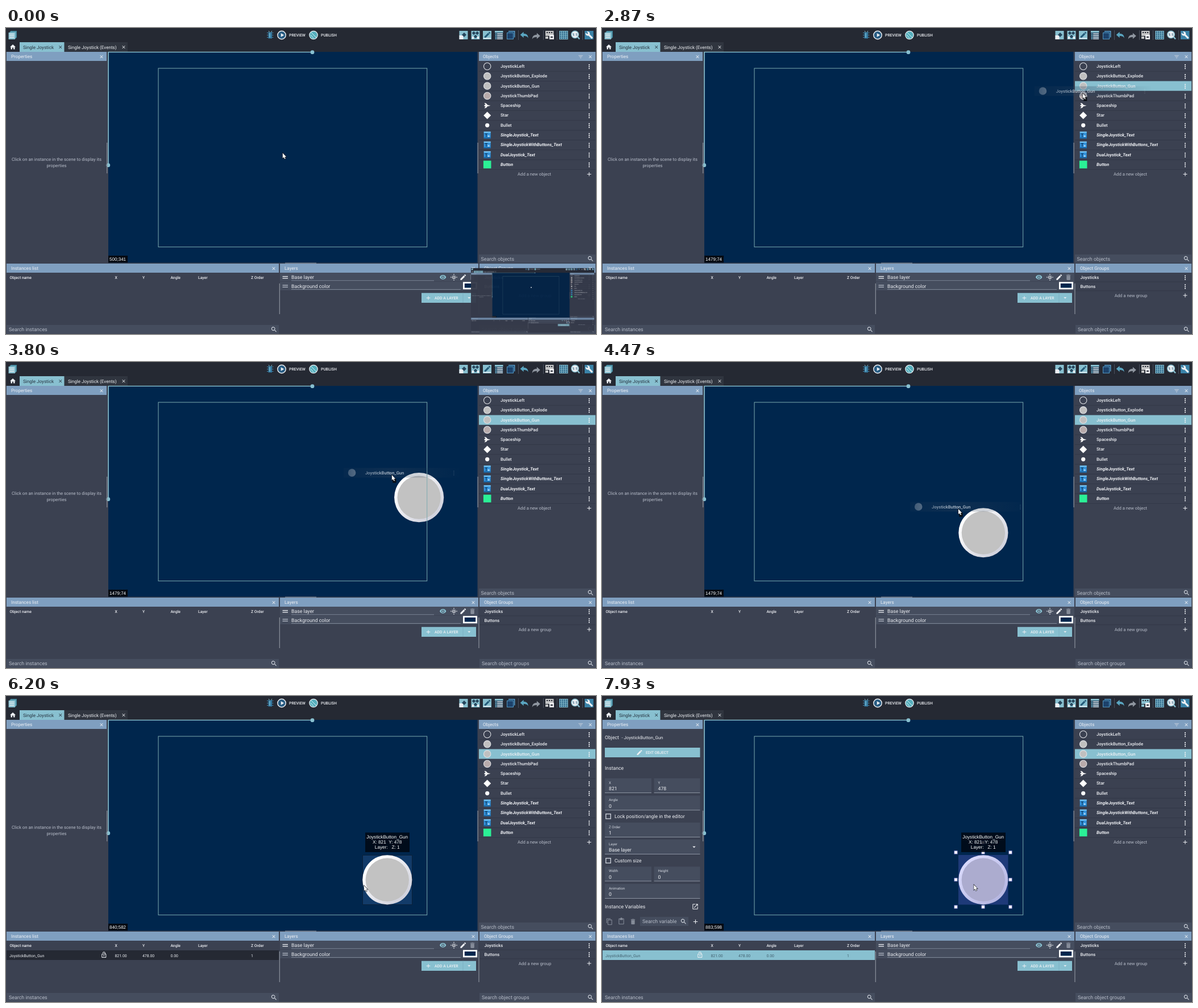
Recreate the animation shown at these times as an HTML page with a canvas. Size 1038x539 px, loop 8000 ms.

```html
<!DOCTYPE html>
<html lang="en">
<head>
<meta charset="utf-8">
<title>Scene editor</title>
<style>
html, body { margin: 0; width: 100%; height: 100%; overflow: hidden; background: #252933; }
canvas { display: block; width: 1038px; height: 539px; }
</style>
</head>
<body>
<canvas id="stage" width="1038" height="539"></canvas>
<script>
const canvas = document.getElementById('stage');
const c = canvas.getContext('2d');
const LOOP = 8000, DRAG = 2670, DROP = 5400, HOVER = 5670, CLICK = 6730;
const BAR = '#252933', PANEL = '#3b4151', FIELD = '#454d5e', HEAD = '#7f9fc0', TEAL = '#88c0d0';
const NAVY = '#00264d', WHITE = '#eef0f4', PALE = '#d3d8e0', MUTED = '#b6bcc8';
const ORIGIN = [268, 71], ZOOM = 0.4375;

// pointer path: time, x, y
const KEYS = [
  [0, 486.8, 220.3], [500, 540, 212], [870, 640, 200], [1000, 710, 181.2], [1070, 741, 174],
  [1300, 812, 140], [1730, 893, 107], [2200, 915.1, 103.4], [2640, 915.1, 103.4], [2870, 846, 115],
  [3470, 738, 171], [3800, 679, 199], [4330, 629, 256.5], [4470, 627, 259], [5200, 627, 281.5],
  [5650, 627, 281.5], [6130, 635.5, 325.6], [6200, 630, 334], [6470, 650, 335],
  [6750, 654.3, 332.6], [8000, 654.3, 332.6]
];
const PRESS = [917, 106];

const ICONS = Object.fromEntries(Object.entries({
  close: 'M19 6.4 17.6 5 12 10.6 6.4 5 5 6.4 10.6 12 5 17.6 6.4 19 12 13.4 17.6 19 19 17.6 13.4 12z',
  add: 'M19 13h-6v6h-2v-6H5v-2h6V5h2v6h6z',
  home: 'M10 20v-6h4v6h5v-8h3L12 3 2 12h3v8z',
  pencil: 'M3 17.25V21h3.75L17.81 9.94l-3.75-3.75zM20.7 7.04a1 1 0 0 0 0-1.41l-2.34-2.34a1 1 0 0 0-1.41 0l-1.83 1.83 3.75 3.75z',
  trash: 'M6 19a2 2 0 0 0 2 2h8a2 2 0 0 0 2-2V7H6zM19 4h-3.5l-1-1h-5l-1 1H5v2h14z',
  search: 'M15.5 14h-.8l-.3-.3a6.5 6.5 0 1 0-.7.7l.3.3v.8l5 5 1.5-1.5zM9.5 14a4.5 4.5 0 1 1 0-9 4.5 4.5 0 0 1 0 9z',
  eye: 'M12 4.5C7 4.5 2.7 7.6 1 12c1.7 4.4 6 7.5 11 7.5s9.3-3.1 11-7.5C21.3 7.6 17 4.5 12 4.5zM12 17a5 5 0 1 1 0-10 5 5 0 0 1 0 10zm0-8a3 3 0 1 0 0 6 3 3 0 0 0 0-6z',
  filter: 'M10 18h4v-2h-4zM3 6v2h18V6zM6 13h12v-2H6z',
  open: 'M19 19H5V5h7V3H5a2 2 0 0 0-2 2v14a2 2 0 0 0 2 2h14a2 2 0 0 0 2-2v-7h-2zM14 3v2h3.6l-9.8 9.8 1.4 1.4L19 6.4V10h2V3z',
  copy: 'M16 1H4a2 2 0 0 0-2 2v14h2V3h12zM19 5H8a2 2 0 0 0-2 2v14a2 2 0 0 0 2 2h11a2 2 0 0 0 2-2V7a2 2 0 0 0-2-2zm0 16H8V7h11z',
  paste: 'M19 2h-4a3 3 0 0 0-6 0H5a2 2 0 0 0-2 2v16a2 2 0 0 0 2 2h14a2 2 0 0 0 2-2V4a2 2 0 0 0-2-2zM19 20H5V4h2v3h10V4h2z',
  lock: 'M18 8h-1V6A5 5 0 0 0 7 6h1.9a3.1 3.1 0 0 1 6.2 0v2H6a2 2 0 0 0-2 2v10a2 2 0 0 0 2 2h12a2 2 0 0 0 2-2V10a2 2 0 0 0-2-2zM18 20H6V10h12zM12 17a2 2 0 1 0 0-4 2 2 0 0 0 0 4z',
  wrench: 'M22.7 19l-9.1-9.1c.9-2.3.4-5-1.5-6.9-2-2-5-2.4-7.4-1.3L9 6 6 9 1.6 4.7C.4 7.1.9 10.1 2.9 12.1c1.9 1.9 4.6 2.4 6.9 1.5l9.1 9.1c.4.4 1 .4 1.4 0l2.3-2.3c.5-.4.5-1.1.1-1.4z',
  undo: 'M10 9V4l-9 8 9 8v-5c6 0 10 1 12 6 0-8-4-12-12-12z',
  redo: 'M14 9V4l9 8-9 8v-5c-6 0-10 1-12 6 0-8 4-12 12-12z',
  down: 'M6 9l6 6 6-6z',
  play: 'M8 4v16l13-8z',
  ship: 'M2 3c6 0 9 3 10 6l11 3-11 3c-1 3-4 6-10 6l4-6-4-1v-4l4-1z',
  arrow: 'M0 0V9L2 7.2 3.5 10.4 4.9 9.8 3.5 6.7H6.2z'
}).map(([name, d]) => [name, new Path2D(d)]));

function rect(x, y, w, h, fill) { c.fillStyle = fill; c.fillRect(x, y, w, h); }
function box(x, y, w, h, stroke, width = 1) {
  c.strokeStyle = stroke; c.lineWidth = width; c.strokeRect(x, y, w, h);
}
function disc(x, y, r, fill, stroke, width = 1) {
  c.beginPath(); c.arc(x, y, r, 0, 7);
  if (fill) { c.fillStyle = fill; c.fill(); }
  if (stroke) { c.strokeStyle = stroke; c.lineWidth = width; c.stroke(); }
}
function line(x1, y1, x2, y2, stroke, width = 1) {
  c.beginPath(); c.moveTo(x1, y1); c.lineTo(x2, y2);
  c.strokeStyle = stroke; c.lineWidth = width; c.stroke();
}
function text(s, x, y, size = 7.75, fill = WHITE, style = '400', align = 'left', family = 'Roboto') {
  c.font = `${style} ${size}px ${family}, sans-serif`;
  c.textAlign = align; c.fillStyle = fill; c.fillText(s, x, y);
}
function icon(name, x, y, size, fill = WHITE) {
  c.save();
  c.translate(x - size / 2, y - size / 2);
  c.scale(size / 24, size / 24);
  c.fillStyle = fill; c.fill(ICONS[name], 'evenodd');
  c.restore();
}
function dots(x, y, fill = WHITE) { for (const d of [-3.2, 0, 3.2]) disc(x, y + d, 1.1, fill); }
function header(s, x, y, w, indent) {
  rect(x, y, w, 16, HEAD);
  text(s, x + indent, y + 11.2, 8.1);
  icon('close', x + w - 9, y + 8.6, 9);
}
function searchBar(s, x, y, w, h, indent) {
  rect(x, y, w, h, FIELD);
  text(s, x + indent, y + h / 2 + 3.3, 8.9, MUTED);
  icon('search', x + w - 8.5, y + h / 2 + .3, 12.5, PALE);
}

// monotone cubic interpolation of the pointer path
function pointer(t) {
  t = Math.max(0, Math.min(LOOP, t));
  let i = KEYS.findIndex(k => k[0] > t) - 1;
  if (i < 0) i = KEYS.length - 2;
  return [1, 2].map(a => {
    const slope = n => n < 0 || n > KEYS.length - 2 ? 0
      : (KEYS[n + 1][a] - KEYS[n][a]) / (KEYS[n + 1][0] - KEYS[n][0]);
    const tangent = n => {
      const p = slope(n - 1), q = slope(n);
      return p * q <= 0 ? 0 : 2 * p * q / (p + q);
    };
    const h = KEYS[i + 1][0] - KEYS[i][0], u = (t - KEYS[i][0]) / h, v = 1 - u;
    return v * v * (1 + 2 * u) * KEYS[i][a] + u * u * (3 - 2 * u) * KEYS[i + 1][a]
      + h * u * v * (v * tangent(i) - u * tangent(i + 1));
  });
}

function toolbar(selected) {
  rect(0, 0, 1038, 42, BAR);
  rect(8, 5, 11, 12, '#3f8298'); rect(6.5, 6.5, 11, 12, '#69aabb'); rect(4.5, 8, 11.5, 12, TEAL);
  for (const y of [10, 13, 16]) rect(6, y, 8.5, 1.3, WHITE);
  // bug
  for (const y of [8.5, 12.5, 16.5]) line(459, y, 470.5, y, '#4383a5');
  line(462, 5, 464, 8, TEAL); line(468, 5, 466, 8, TEAL);
  rect(461.5, 7.5, 6.5, 11, '#3478a0'); rect(463, 9, 2, 8, '#66aac4');
  disc(485, 12.5, 7.2, '#285c83', WHITE, 1.4);
  icon('play', 485.4, 12.5, 10);
  text('PREVIEW', 498, 15.2, 6.85, WHITE, '500');
  disc(541, 12.5, 7.2, '#55aebc', WHITE, 1.2);
  line(536.5, 7.5, 546, 17, '#d8f1f4'); line(536, 12, 541, 18, '#d8f1f4');
  text('PUBLISH', 554, 15.2, 6.85, WHITE, '500');

  for (const x of [797.5, 818.5, 839]) rect(x, 5, 15, 15, TEAL);
  const gem = (x, y, r, fill) => {
    c.beginPath(); c.moveTo(x, y - r); c.lineTo(x + r, y); c.lineTo(x, y + r); c.lineTo(x - r, y);
    c.fillStyle = fill; c.fill();
  };
  rect(797.5, 13, 7, 7, WHITE); gem(806, 12, 4, '#26465d');
  for (const [x, y] of [[823, 9], [829, 9], [826, 15]]) gem(x, y, 3.2, '#26465d');
  rect(820, 15, 3, 4, WHITE); rect(829, 15, 3, 4, WHITE);
  icon('pencil', 847, 12, 14, '#245a78'); rect(840, 17.5, 13, 1.5, WHITE);
  rect(860, 5, 14.5, 15, '#274d68'); rect(860, 5, 14.5, 3, TEAL);
  for (const y of [9.5, 12.5, 15.5, 18.3]) { rect(861, y, 2, 1.4, TEAL); rect(864, y, 10, 1.4, WHITE); }
  rect(884, 5, 11.5, 11.5, '#5c9bc5'); rect(882.5, 6.5, 11.5, 11.5, '#18446c');
  box(881.5, 8.5, 11, 11, '#5294bd'); rect(882, 9, 10, 10, '#1d426b');
  icon('undo', 912, 12, 16, '#5aa5c0');
  icon('redo', 932.5, 14, 16, '#8e959f');
  const tone = selected ? TEAL : '#c4c5c6';
  rect(949, 5, 14.5, 9, tone);
  for (const x of [951, 955, 959]) rect(x, 7, 2.2, 2, BAR);
  rect(949, 15, 5, 4, tone); rect(956, 12, 8, 8, WHITE); rect(958, 15, 4, 2, BAR);
  rect(973.5, 5, 15, 15, '#235b80');
  for (let i = 0; i < 5; i++) {
    rect(973.5 + i * 3.5, 5, 1.1, 15, TEAL); rect(973.5, 5 + i * 3.5, 15, 1.1, TEAL);
  }
  line(1005, 15, 1009, 19.5, TEAL, 2.4);
  disc(1001, 11.5, 6.3, WHITE, TEAL, 1.5);
  text('1:1', 1001, 14, 6.5, '#245a78', '700', 'center');
  rect(1018, 5, 15.5, 15, '#3a83a8'); icon('wrench', 1026, 12.5, 14);
  for (const x of [901.5, 945.5, 969.5, 1014.5]) rect(x - .5, 4, 1, 17, '#4a505d');

  icon('home', 12, 33.5, 12);
  rect(24, 25, 78.5, 17, TEAL);
  text('Single Joystick', 30, 36.8, 8.1, '#26323f');
  icon('close', 95.7, 33.7, 9, '#26323f');
  rect(103, 25, 111, 17, '#30353f');
  text('Single Joystick (Events)', 109, 36.8, 8.1);
  icon('close', 207, 33.7, 9);
}

function field(name, value, x, y, w) {
  rect(x, y, w, 25.5, FIELD); rect(x, y + 25, w, 1, '#8b93a1');
  text(name, x + 7, y + 9.7, 6.2, PALE);
  text(value, x + 7, y + 21, 8.7);
}
function checkbox(s, y) {
  box(6.8, y + .8, 8.4, 8.4, PALE, 1.3);
  text(s, 22, y + 8, 8.65);
}
function properties(selected) {
  header('Properties', 1, 42, 176, 8);
  if (!selected) {
    text('Click on an instance in the scene to display its', 89, 234, 7.75, MUTED, '400', 'center');
    text('properties', 89, 245, 7.75, MUTED, '400', 'center');
    return;
  }
  text('Object', 5, 75.7, 8.7);
  text('- JoystickButton_Gun', 34.5, 75.7, 7.75);
  rect(5, 91, 167.5, 17, TEAL);
  icon('pencil', 66, 99.5, 12);
  text('EDIT OBJECT', 77, 102, 6.7, WHITE, '500');
  text('Instance', 5, 130, 8.7);
  field('X', '821', 5, 145, 82); field('Y', '478', 91.5, 145, 81);
  field('Angle', '0', 5, 175.5, 167.5);
  checkbox('Lock position/angle in the editor', 207);
  field('Z Order', '1', 5, 223, 167.5);
  field('Layer', 'Base layer', 5, 253, 167.5); icon('down', 162, 266, 11);
  checkbox('Custom size', 285);
  field('Width', '0', 5, 300.5, 82); field('Height', '0', 91.5, 300.5, 81);
  field('Animation', '0', 5, 331, 167.5);
  text('Instance Variables', 5, 374, 8.7);
  icon('open', 164, 371, 12.5);
  icon('copy', 13, 397.5, 12.5, '#858c99'); icon('paste', 34, 397, 12.5, '#858c99');
  icon('trash', 54.5, 397.5, 12.5, '#858c99');
  searchBar('Search variable', 67, 389, 85, 16, 4);
  icon('add', 164.5, 397.5, 13);
}

function rowIcon(i, y) {
  const x = 846.7;
  if (i < 4) disc(x, y, 6.2, [null, '#c0c0c0', '#c0c0c0', '#b8abab'][i], '#dfe1e5', 1.1);
  else if (i === 4) icon('ship', x, y, 12.5, '#f4f4f4');
  else if (i === 5) {
    c.save(); c.translate(x, y); c.rotate(Math.PI / 4); rect(-4.6, -4.6, 9.2, 9.2, '#fff'); c.restore();
  } else if (i === 6) disc(x, y, 3.6, '#fff');
  else if (i < 10) {
    rect(x - 6, y - 6, 12, 12, '#3393dc'); rect(x - 6, y - 6, 12, 2, '#7ac5ef');
    rect(x - 6, y + 4, 12, 2, '#1765a3');
    text('T', x - 4.5, y + 3.5, 8.5, '#0c3457', '700'); text('a', x + .8, y + 3.3, 6, '#d2ecfb', '700');
  } else rect(x - 6.8, y - 6.8, 13.6, 13.6, '#2bf096');
}
function objects(picked) {
  header('Objects', 832, 42, 205, 7);
  icon('filter', 1011, 50.7, 10, PALE);
  ['JoystickLeft', 'JoystickButton_Explode', 'JoystickButton_Gun', 'JoystickThumbPad', 'Spaceship', 'Star',
    'Bullet', 'SingleJoystick_Text', 'SingleJoystickWithButtons_Text', 'DualJoystick_Text', 'Button'
  ].forEach((name, i) => {
    const y = 67.5 + i * 17.3;
    rect(832, y + 8.3, 205, 1, '#323847');
    if (picked && i === 2) rect(832, y - 8.6, 205, 17.2, TEAL);
    rowIcon(i, y);
    text(name, 870, y + 2.4, 7.65, WHITE, i < 7 ? '500' : 'italic 700');
    dots(1026, y + .6);
  });
  text('Add a new object', 929.5, 260, 7.7, MUTED, '400', 'center');
  icon('add', 1026, 257.5, 12);
  searchBar('Search objects', 832, 399, 205, 14.5, 3.5);
}

function bottom(t) {
  header('Instances list', 1, 415, 479, 8);
  [['Object name', 6.5], ['X', 191.5], ['Y', 240], ['Angle', 289.5], ['Layer', 338], ['Z Order', 431]]
    .forEach(([s, x]) => text(s, x, 441.5, 6.8, WHITE, '500'));
  if (t >= DROP) {
    const on = t >= CLICK, ink = on ? '#42606f' : WHITE;
    rect(1, 448, 479, 17, on ? TEAL : BAR);
    [['JoystickButton_Gun', 6], ['821.00', 191.5], ['478.00', 240], ['0.00', 289.5], ['1', 431]]
      .forEach(([s, x]) => text(s, x, 459.5, 6.9, ink));
    icon('lock', 172.3, 456, 12);
  }
  searchBar('Search instances', 1, 523, 479, 15.5, 4);

  header('Layers', 482, 415, 349, 8);
  rect(482, 431, 349, 15.3, FIELD); rect(482, 447, 349, 15, FIELD);
  [['Base layer', 442, 251, WHITE], ['Background color', 457.5, 298, MUTED]].forEach(([s, y, w, tone]) => {
    rect(486.5, y - 5, 9.5, 1.3, tone); rect(486.5, y - 1.8, 9.5, 1.3, tone);
    text(s, 502, y, 8.75); rect(502, y + 2.5, w, 1, '#7d8695');
  });
  icon('eye', 768.7, 439, 12.5, TEAL);
  disc(788, 439, 2, null, WHITE, 1.2);
  for (let i = 0; i < 8; i++) {
    const a = i * Math.PI / 4, r = i % 2 ? 4.5 : 6;
    line(788 + 3.6 * Math.cos(a), 439 + 3.6 * Math.sin(a), 788 + r * Math.cos(a), 439 + r * Math.sin(a), WHITE);
  }
  icon('pencil', 804.3, 439, 13); icon('trash', 820.6, 439, 13, '#858c99');
  rect(804, 447.3, 25, 13, '#fff'); rect(806.8, 450, 19.4, 7.6, NAVY);
  rect(731, 466.7, 96, 17.3, TEAL); rect(803.5, 466.7, 1, 17.3, '#7db2c3');
  icon('add', 743, 475.5, 11.5);
  text('ADD A LAYER', 754, 478, 6.85, WHITE, '500');
  icon('down', 814.8, 475.5, 10);

  header('Object Groups', 833, 415, 204, 8);
  ['Joysticks', 'Buttons'].forEach((s, i) => {
    const y = 439.3 + i * 15.7;
    text(s, 841.5, y + 2.5, 7.65, WHITE, '500');
    dots(1026, y + .5); rect(833, y + 7.3, 204, 1, '#323847');
  });
  text('Add a new group', 930.5, 473.5, 7.7, MUTED, '400', 'center');
  icon('add', 1026, 471, 12);
  searchBar('Search object groups', 833, 523, 204, 15.5, 4);

  for (const [x, y] of [[177, 202], [829.5, 202], [480.7, 450], [831.3, 450]]) rect(x, y, 1.3, 54, '#858b96');
  rect(491, 413.5, 55, 1.2, '#858b96');
}

function scene(t) {
  c.save();
  c.beginPath(); c.rect(180, 42, 649.5, 371.5); c.clip();
  rect(180, 42, 650, 372, NAVY);
  const hover = t >= HOVER, picked = t >= CLICK, p = pointer(t - 30);
  const [x, y] = t < DROP ? [p[0], p[1] - 1.5] : [627, 280];
  if (t > DRAG && p[0] < 829) {
    if (hover && !picked) { rect(x, y, 87.5, 87.5, '#123b69'); box(x + .5, y + .5, 87, 87, '#0b2038'); }
    const shade = c.createLinearGradient(x + 15, y + 15, x + 72, y + 72);
    shade.addColorStop(0, '#fff'); shade.addColorStop(1, '#d2d3de');
    disc(x + 43.8, y + 43.8, 43.6, shade);
    disc(x + 43.8, y + 43.8, 38.2, '#c2c2c2');
    if (picked) rect(x, y, 87.5, 87.5, 'rgba(112,112,240,.27)');
  }
  box(268, 71, 472.7, 314.7, '#7fa9b0');
  if (picked) {
    const knob = (a, b) => { rect(a - 2.7, b - 2.7, 5.4, 5.4, '#fff'); box(a - 2.7, b - 2.7, 5.4, 5.4, '#6c6cc0', .8); };
    for (const a of [622.5, 670.5, 718.5]) for (const b of [275.5, 323.5, 371.5])
      if (a !== 670.5 || b !== 323.5) knob(a, b);
    knob(670.5, 258);
  }
  if (hover) {
    rect(632, 240.5, 78, 34.5, 'rgba(0,5,15,.8)');
    ['JoystickButton_Gun', 'X: 821\u00a0 Y: 478', 'Layer:\u00a0\u00a0 Z: 1'].forEach((s, i) =>
      text(s, 670.7, 251 + i * 9.2, 8.2, '#fff', '400', 'center', 'Liberation Sans'));
  }
  const seen = pointer(t < HOVER ? Math.min(t - 70, 2600) : t - 70);
  const label = seen.map((v, i) => Math.round((v - ORIGIN[i]) / ZOOM)).join(';');
  c.font = '400 8.05px Liberation Sans, sans-serif';
  rect(180, 401, c.measureText(label).width + 5, 12.5, '#050a12');
  text(label, 182, 410.3, 8.05, '#fff', '400', 'left', 'Liberation Sans');
  c.restore();
  rect(179.3, 42, 1.6, 200, TEAL); rect(180, 41.8, 359, 1.4, TEAL);
  disc(539, 42.7, 3.4, TEAL); disc(179.8, 241.7, 3.4, TEAL);
}

function ghost([px, py]) {
  const glow = (rgb, a) => {
    const g = c.createRadialGradient(px, py, 5, px, py, 125);
    g.addColorStop(0, `rgba(${rgb},${a})`); g.addColorStop(1, `rgba(${rgb},0)`);
    return g;
  };
  const dx = px - PRESS[0], dy = py - PRESS[1];
  rect(832 + dx, 93.5 + dy, 205, 17, glow('45,65,90', .3));
  disc(846.7 + dx, 102 + dy, 6.8, glow('205,208,214', .75));
  text('JoystickButton_Gun', 870 + dx, 104.5 + dy, 7.65, glow('225,232,240', .82), '500');
  dots(1026 + dx, 102.5 + dy, glow('225,232,240', .8));
}

function thumbnail(t) {
  c.save();
  c.globalAlpha = .95 * (1 - (t / 2200) ** 1.3);
  c.imageSmoothingQuality = 'high';
  c.drawImage(canvas, 0, 0, 1038, 539, 818, 422.5, 217, 114);
  rect(818, 422.5, 217, 114, 'rgba(15,20,32,.15)');
  disc(924, 457, .9, WHITE);
  c.restore();
}

function draw(t) {
  c.textRendering = 'geometricPrecision';
  rect(0, 0, 1038, 539, PANEL);
  toolbar(t >= CLICK);
  properties(t >= CLICK);
  scene(t);
  objects(t >= DRAG);
  bottom(t);
  if (t < 2200) thumbnail(t);
  const tip = pointer(t), dragging = t >= DRAG && t < DROP;
  if (dragging) ghost(tip);
  c.save();
  c.translate(...tip);
  if (dragging) { rect(1.5, 7, 6, 6.5, '#080b10'); rect(3, 9.5, 3, 1, '#8c929b'); }
  c.lineWidth = 1.2; c.strokeStyle = '#10141a'; c.stroke(ICONS.arrow);
  c.fillStyle = '#fff'; c.fill(ICONS.arrow);
  c.restore();
}

const start = performance.now();
function tick() {
  draw((performance.now() - start) % LOOP);
  requestAnimationFrame(tick);
}
tick();
</script>
</body>
</html>
```
